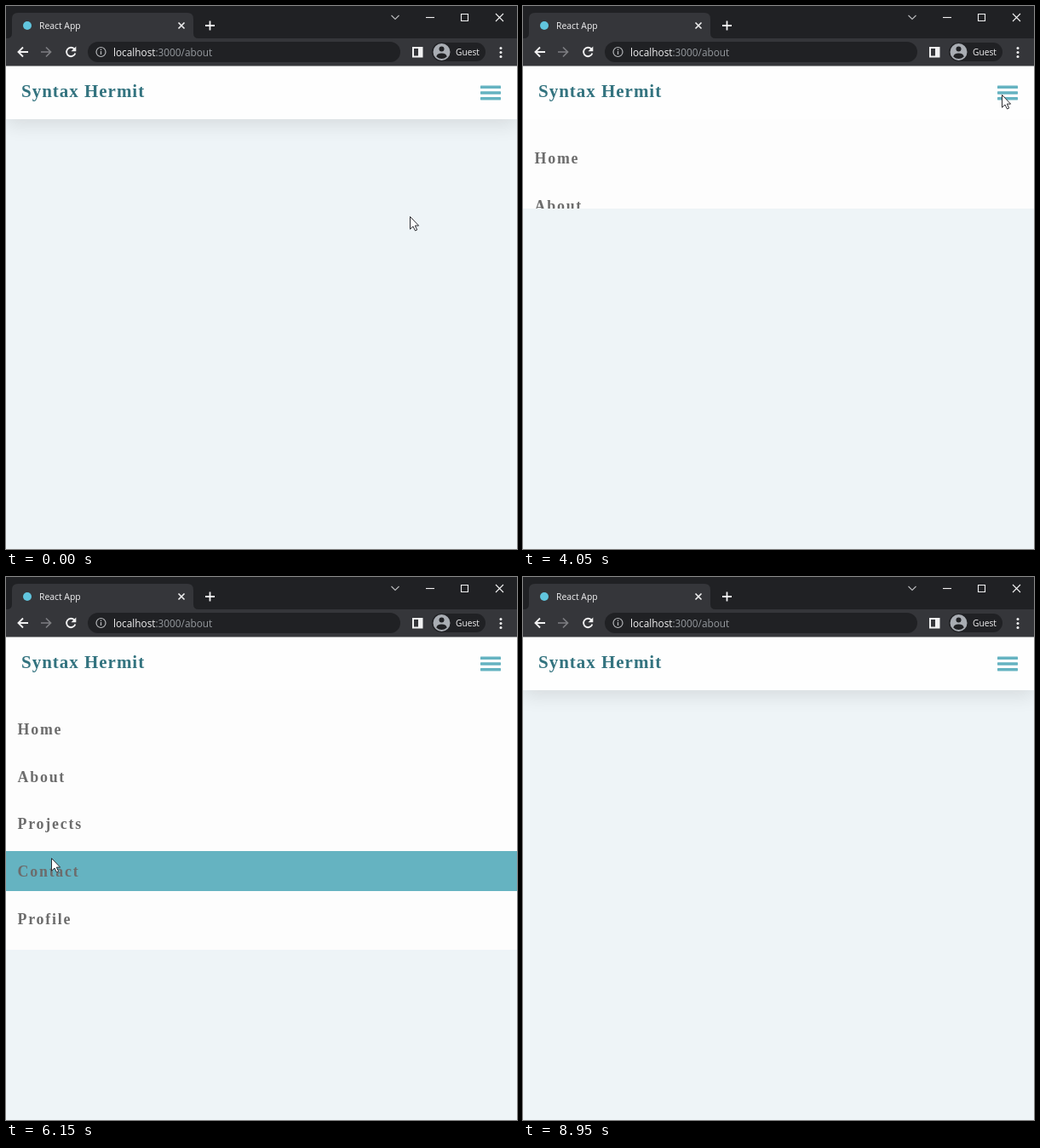
Recreate the animation shown at these times as an HTML page with a canvas. Size 600x638 px, loop 9000 ms.

```html
<!DOCTYPE html>
<html lang="en">
<head>
<meta charset="utf-8">
<title>Navbar</title>
<style>
  html, body { margin: 0; width: 100%; height: 100%; overflow: hidden; background: #eef4f7; }
  canvas { display: block; }
</style>
</head>
<body>
<canvas id="stage" width="600" height="638"></canvas>
<script>
const ctx = document.getElementById('stage').getContext('2d');
const LOOP = 9000, STEP = 50;
const UI = '"Open Sans", "Noto Sans", sans-serif';
const SERIF = '"Liberation Serif", serif';
const TEAL = '#65b3c1', DARK = '#202124', BAR = '#35363a', LIGHT = '#f1f1f2';
const LINKS = ['Home', 'About', 'Projects', 'Contact', 'Profile'];
const NAV_TOP = 70, NAV_BOTTOM = 133, MENU_HEIGHT = 305;
const SLIDE = 290, FADE = 200;

// time, x, y of the pointer tip
const PATH = [
  [0, 474, 247], [250, 474, 247], [900, 562, 104], [4200, 562, 104],
  [4650, 40, 212], [4900, 40, 212], [5550, 48, 283], [5950, 53, 330],
  [6550, 53, 330], [7100, 522, 109], [7250, 522, 109], [7600, 562, 104],
  [8150, 562, 104], [8450, 614, 104]
];
// time, direction of each menu toggle
const TOGGLES = [[1500, 1], [2706, -1], [3950, 1], [7900, -1]];

const clamp = v => Math.min(1, Math.max(0, v));
const ease = p => p * p * (3 - 2 * p);
const baseline = i => 184.7 + 55.8 * i;
const bandTop = i => baseline(i) - 29.6;

function pointer(t) {
  const i = PATH.findIndex(k => k[0] > t);
  if (i < 0) return PATH[PATH.length - 1].slice(1);
  if (i === 0) return PATH[0].slice(1);
  const [t0, x0, y0] = PATH[i - 1], [t1, x1, y1] = PATH[i];
  const p = ease((t - t0) / (t1 - t0));
  return [x0 + (x1 - x0) * p, y0 + (y1 - y0) * p];
}

const menuHeight = t => MENU_HEIGHT *
  clamp(TOGGLES.reduce((sum, [at, dir]) => sum + dir * clamp((t - at) / SLIDE), 0));

function hovered(i, t) {
  const y = pointer(t)[1], top = bandTop(i);
  return y > top + 2 && y < top + 47 && y < NAV_BOTTOM + menuHeight(t);
}

// averaging recent hover states gives a linear fade in and out
function bandAlpha(i, t) {
  const n = 20;
  let sum = 0;
  for (let k = 0; k < n; k++) sum += hovered(i, t - k * FADE / n);
  return sum / n;
}

function rect(x, y, w, h, color) {
  ctx.fillStyle = color;
  ctx.fillRect(x, y, w, h);
}

function pill(x, y, w, h, r, color) {
  ctx.fillStyle = color;
  ctx.beginPath();
  ctx.roundRect(x, y, w, h, r);
  ctx.fill();
}

function disc(x, y, r, color) {
  ctx.fillStyle = color;
  ctx.beginPath();
  ctx.arc(x, y, r, 0, Math.PI * 2);
  ctx.fill();
}

function stroke(d, color, width) {
  ctx.strokeStyle = color;
  ctx.lineWidth = width;
  ctx.stroke(new Path2D(d));
}

function text(s, x, y, font, color, spacing = 0) {
  ctx.font = font;
  ctx.letterSpacing = spacing + 'px';
  ctx.fillStyle = color;
  ctx.fillText(s, x, y);
  return ctx.measureText(s).width;
}

function drawTabs() {
  rect(0, 0, 600, 38, DARK);
  ctx.fillStyle = BAR;
  ctx.fill(new Path2D('M1 38Q7 38 7 32V15Q7 8 14 8H213Q220 8 220 15V32Q220 38 226 38Z'));
  disc(25, 23, 5, '#61c5de');
  text('React App', 39, 27, '10.4px ' + UI, LIGHT);
  stroke('M202.5 19.5l7 7m0-7l-7 7', LIGHT, 1.6);
  stroke('M234 23h11M239.5 17.5v11', LIGHT, 1.8);
  stroke('M452.5 11l4.5 4.5 4.5-4.5', '#b9babc', 1.1);
  stroke('M493 13.5h10', LIGHT, 1.1);
  stroke('M534.5 9.5h8v8h-8z', LIGHT, 1.1);
  stroke('M575 9l9 9m0-9l-9 9', LIGHT, 1.1);
}

function drawToolbar() {
  // ends half a pixel into the navbar, leaving a soft grey edge
  rect(0, 38, 600, 32.5, BAR);
  stroke('M26 54H14.5M20 48.5L14.5 54l5.5 5.5', LIGHT, 1.9);
  stroke('M41 54h11.5M47 48.5l5.5 5.5-5.5 5.5', '#7d7e82', 1.7);
  stroke('M80.2 50.5A5.2 5.2 0 1 0 81.3 55.4', LIGHT, 1.9);
  ctx.fillStyle = LIGHT;
  ctx.fill(new Path2D('M82.3 47.5v5.8h-5.8z'));

  pill(96, 42, 367, 24, 12, DARK);
  stroke('M106 54a5.5 5.5 0 1 0 11 0a5.5 5.5 0 1 0-11 0', '#b4b6b9', 1.2);
  stroke('M111.5 53v4M111.5 50.5v1.4', '#b4b6b9', 1.3);
  const font = '11.8px ' + UI;
  const w = text('localhost', 126, 58.5, font, LIGHT);
  text(':3000/about', 126 + w, 58.5, font, '#94989d');

  stroke('M478 49h10.5v10.5H478z', LIGHT, 2);
  rect(484, 49, 4.5, 10.5, LIGHT);

  pill(500, 43, 63, 22, 11, DARK);
  disc(511.5, 54, 10, '#a9adb3');
  disc(511.5, 50.5, 3, DARK);
  ctx.fillStyle = DARK;
  ctx.fill(new Path2D('M505.3 59.5Q506 55.5 511.5 55.5T517.7 59.5Q515 62 511.5 62T505.3 59.5Z'));
  text('Guest', 528, 57.8, '10.2px ' + UI, LIGHT);
  for (const y of [49.5, 54.5, 59.5]) disc(581, y, 1.5, LIGHT);
}

function drawNav() {
  ctx.save();
  ctx.shadowColor = 'rgba(0,0,0,0.1)';
  ctx.shadowBlur = 22;
  ctx.shadowOffsetY = 7;
  rect(0, NAV_TOP, 600, NAV_BOTTOM - NAV_TOP, '#fefefe');
  ctx.restore();
}

function drawNavContent() {
  text('Syntax Hermit', 18, 107, 'bold 21px ' + SERIF, '#33737f', 0.98);
  for (const y of [93.6, 100.3, 107]) pill(557, y, 24, 3.4, 0.6, TEAL);
}

function drawMenu(t) {
  const h = menuHeight(t);
  if (h <= 0) return;
  ctx.save();
  ctx.beginPath();
  ctx.rect(0, NAV_BOTTOM, 600, Math.round(h));
  ctx.clip();
  rect(0, NAV_BOTTOM, 600, MENU_HEIGHT, '#fdfdfd');
  LINKS.forEach((label, i) => {
    ctx.globalAlpha = bandAlpha(i, t);
    rect(0, Math.round(bandTop(i)), 600, 47, TEAL);
    ctx.globalAlpha = 1;
    text(label, 13.5, baseline(i), 'bold 17.85px ' + SERIF, '#6c6c6c', 1.8);
  });
  ctx.restore();
}

function drawPointer(t) {
  const [x, y] = pointer(t);
  const d = 'M.5.5V15.2L4 12 6.5 17 8.7 16 6.3 11.1H10.6Z';
  ctx.save();
  ctx.translate(Math.round(x), Math.round(y));
  ctx.fillStyle = '#fff';
  ctx.fill(new Path2D(d));
  stroke(d, '#2b2b30', 1);
  ctx.restore();
}

function draw() {
  const t = Math.floor(performance.now() % LOOP / STEP) * STEP;
  rect(0, 0, 600, 638, '#eef4f7');
  drawNav();
  drawMenu(t);
  drawNavContent();
  drawTabs();
  drawToolbar();
  drawPointer(t);
  requestAnimationFrame(draw);
}
draw();
</script>
</body>
</html>
```
